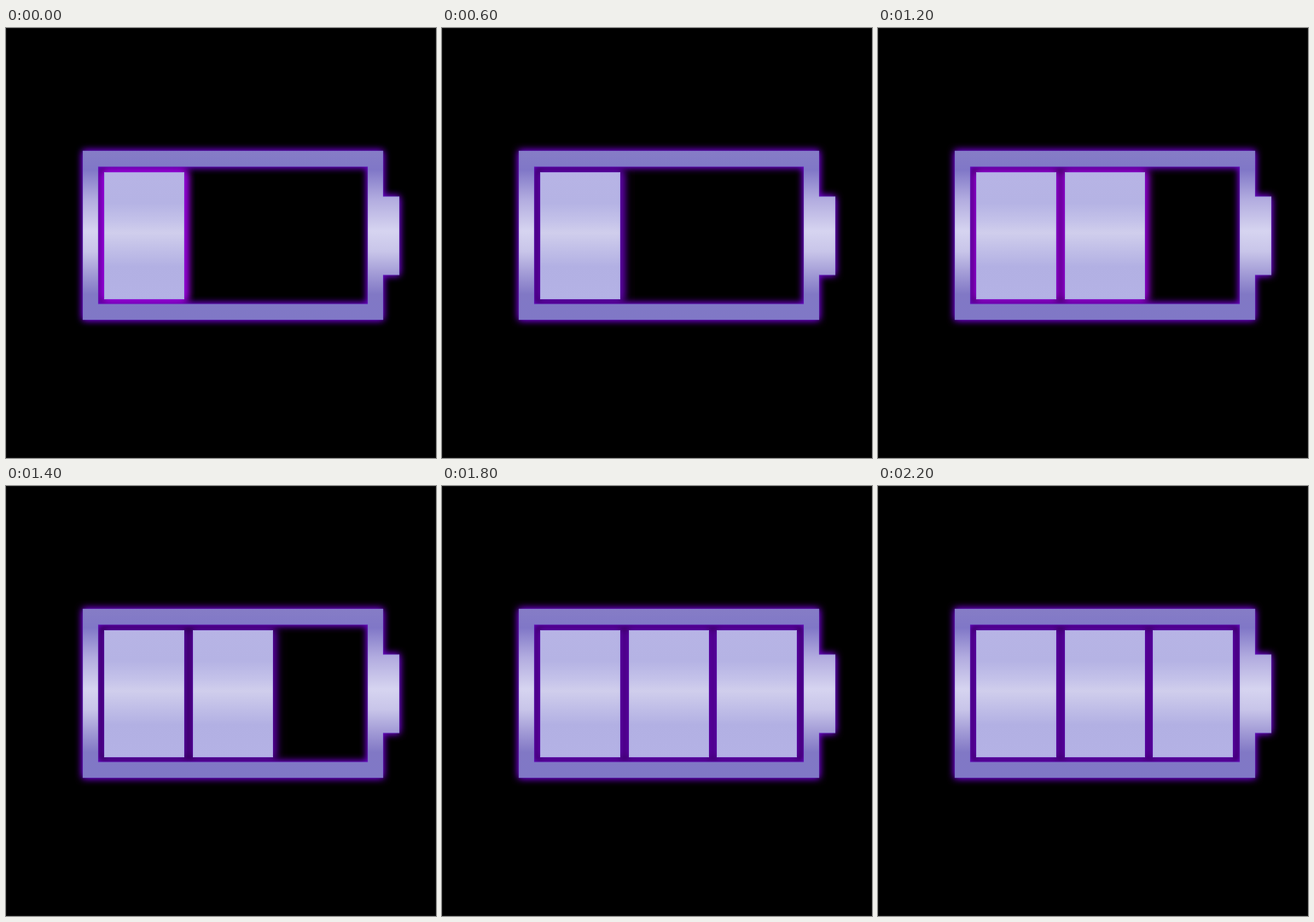
An HTML page with a canvas for the animation above (2400 ms loop, 504 by 504 pixels).

```html
<!DOCTYPE html>
<html lang="en">
<head>
<meta charset="utf-8">
<title>Charging battery</title>
<style>
html, body { margin: 0; width: 100%; height: 100%; overflow: hidden; background: #000; }
canvas { display: block; width: 504px; height: 504px; }
</style>
</head>
<body>
<canvas id="stage" width="504" height="504"></canvas>
<script>
const ctx = document.getElementById('stage').getContext('2d');
const SIZE = 504, STEP = 200, STEPS = 12, AWAY = 2000;
const CELL = { y: 169, w: 94, h: 149, xs: [115, 219, 322] };

// Battery outline with its terminal, and the hollow inside.
const shell = new Path2D();
[[90, 144], [442, 144], [442, 197.5], [461, 197.5],
 [461, 289.5], [442, 289.5], [442, 342], [90, 342]]
  .forEach(([x, y]) => shell.lineTo(x, y));
shell.closePath();
shell.rect(108, 162.5, 316, 161);

function gradient(stops) {
  const g = ctx.createLinearGradient(0, 144, 0, 342);
  for (const [y, color] of stops) g.addColorStop((y - 144) / 198, color);
  return g;
}

const shellFill = gradient([
  [144, '#867dc6'], [166, '#8077c7'], [200, '#b1abdf'], [238, '#d6d4f0'],
  [262, '#c8c5e9'], [288, '#a29bd6'], [312, '#8178c5'], [342, '#8078c6']
]);
const cellFill = gradient([
  [169, '#b7b4e5'], [205, '#b5b3e4'], [225, '#c3c1e9'], [240, '#d0ceec'],
  [258, '#c2c0e8'], [280, '#b2b0e3'], [318, '#b4b2e5']
]);

// Paints only the blurred shadow; the shape itself stays off the canvas.
function glow(color, blur, passes, paint) {
  ctx.save();
  ctx.shadowColor = color;
  ctx.shadowBlur = blur;
  ctx.shadowOffsetX = AWAY;
  ctx.translate(-AWAY, 0);
  ctx.fillStyle = '#000';
  for (let i = 0; i < passes; i++) paint();
  ctx.restore();
}

function draw(step) {
  const count = 1 + Math.floor(step / 4);
  const lit = step % 2 === 0;
  const full = count === 3;
  const cells = CELL.xs.slice(0, count);

  ctx.fillStyle = '#000';
  ctx.fillRect(0, 0, SIZE, SIZE);
  ctx.strokeStyle = '#0e0e0e';
  ctx.lineWidth = 1;
  ctx.strokeRect(0.5, 0.5, SIZE - 1, SIZE - 1);

  glow(full && lit ? '#8c00fa' : '#6a00c4', 9, 2,
    () => ctx.fill(shell, 'evenodd'));

  const cellGlow = lit ? '#9600da' : '#5800a0';
  const passes = count === 2 ? 2 : 3;
  ctx.save();
  ctx.beginPath();
  ctx.rect(108, 162, 316, 162);
  ctx.clip();
  for (const x of cells) {
    glow(cellGlow, 10, passes,
      () => ctx.fillRect(x - 2, CELL.y - 2, CELL.w + 4, CELL.h + 4));
  }
  ctx.restore();

  ctx.fillStyle = shellFill;
  ctx.fill(shell, 'evenodd');
  ctx.strokeStyle = 'rgba(110, 80, 200, 0.35)';
  ctx.stroke(shell);

  for (const x of cells) {
    ctx.fillStyle = cellFill;
    ctx.fillRect(x, CELL.y, CELL.w, CELL.h);
    ctx.strokeStyle = 'rgba(150, 130, 222, 0.4)';
    ctx.strokeRect(x + 0.5, CELL.y + 0.5, CELL.w - 1, CELL.h - 1);
  }
}

const start = performance.now();
let shown = -1;

function tick(now) {
  const step = Math.floor(Math.max(0, now - start) / STEP) % STEPS;
  if (step !== shown) {
    shown = step;
    draw(step);
  }
  requestAnimationFrame(tick);
}
tick(start);
</script>
</body>
</html>
```
